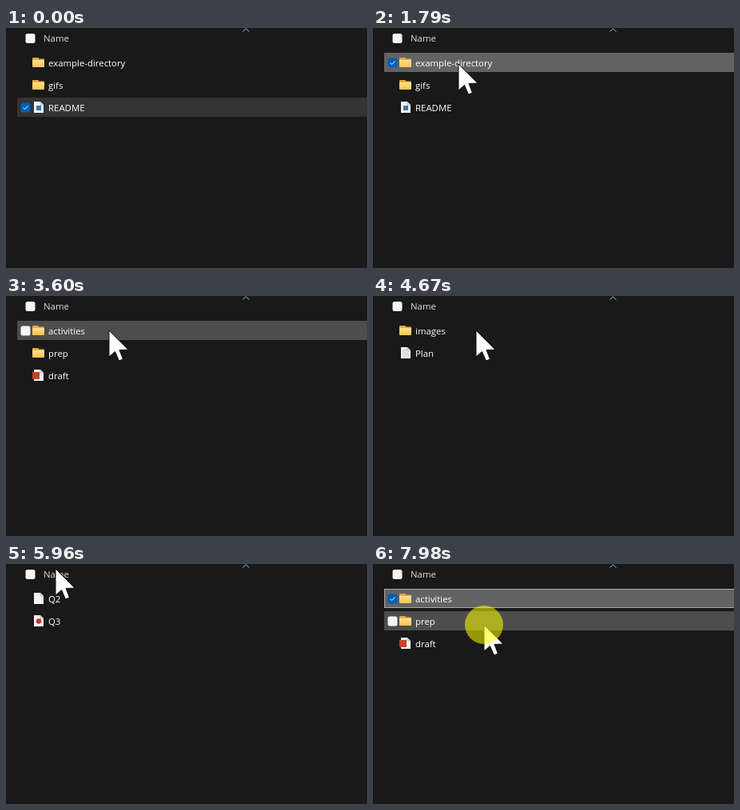
Write an HTML page with a canvas that moves like this. It is 452 px wide and 300 px high and loops after 8 s.

```html
<!DOCTYPE html>
<html lang="en">
<head>
<meta charset="utf-8">
<style>
html, body { margin: 0; width: 100%; height: 100%; overflow: hidden; background: #191919; }
canvas { display: block; }
</style>
</head>
<body>
<canvas id="stage" width="452" height="300"></canvas>
<script>
const ctx = document.getElementById('stage').getContext('2d');
const LOOP = 8000, STEP = 70, ROW_TOP = 31, ROW_HEIGHT = 24, ROW_PITCH = 28;

const rootDir = [['folder', 'example-directory'], ['folder', 'gifs'], ['markdown', 'README']];
const exampleDir = [['folder', 'workshop']];
const workshopDir = [['folder', 'activities'], ['folder', 'prep'], ['slides', 'draft']];
const activitiesDir = [['folder', 'images'], ['text', 'Plan']];
const imagesDir = [['page', 'Q2'], ['pdf', 'Q3']];

// at: start time, hoverAt: when rows begin to react to the pointer
const scenes = [
  { at: 0, rows: rootDir, selected: 2, inactive: true, hoverAt: 0 },
  { at: 1110, rows: rootDir, selected: 0, hoverAt: 0 },
  { at: 1990, rows: exampleDir, hoverAt: 2120 },
  { at: 3140, rows: exampleDir, selected: 0, hoverAt: 0 },
  { at: 3530, rows: workshopDir, hoverAt: 3600 },
  { at: 4270, rows: workshopDir, selected: 0, hoverAt: 0 },
  { at: 4670, rows: activitiesDir, hoverAt: 4740 },
  { at: 5010, rows: activitiesDir, selected: 0, hoverAt: 0 },
  { at: 5280, rows: imagesDir, hoverAt: 5350 },
  { at: 6700, rows: activitiesDir, selected: 0, focusAt: 6830, hoverAt: 0 },
  { at: 7300, rows: workshopDir, selected: 0, focusAt: 7300, hoverAt: 0 },
];

const linear = u => u;
const easeInOut = u => u < .5 ? 2 * u * u : 1 - 2 * (1 - u) ** 2;
const easeOut = u => 1 - (1 - u) ** 1.5;
const easeIn = u => u ** 1.5;
const moves = [
  { at: 200, steps: 12, from: [140, 304], to: [107, 45], ease: easeInOut },
  { at: 2650, steps: 5, from: [107, 45], to: [129, 43], ease: easeOut },
  { at: 5690, steps: 7, from: [129, 43], to: [-26, -42], ease: easeIn },
  { at: 7440, steps: 8, from: [-8, -20], to: [139, 76], ease: linear },
];
const presses = [[1110, 1250], [1720, 1790], [3140, 3210], [3410, 3480],
  [4270, 4340], [5010, 5080], [5210, 5280], [7980, 8000]];

const latest = (list, t) => list.filter(item => item.at <= t).pop();

function pointerAt(t) {
  const move = latest(moves, t);
  if (!move) return [-60, -60];
  const step = Math.min(move.steps, Math.floor((t - move.at) / STEP) + 1);
  const u = move.ease(step / move.steps);
  return move.from.map((a, i) => Math.round(a + (move.to[i] - a) * u));
}

function rowAt([x, y]) {
  const offset = y - ROW_TOP;
  return x >= 14 && offset >= 0 && offset % ROW_PITCH < ROW_HEIGHT ? Math.floor(offset / ROW_PITCH) : -1;
}

function box(x, y, w, h, color, radius = 0) {
  ctx.fillStyle = color;
  ctx.beginPath();
  ctx.roundRect(x, y, w, h, radius);
  ctx.fill();
}

function dot(x, y, r, color) {
  ctx.fillStyle = color;
  ctx.beginPath();
  ctx.arc(x, y, r, 0, 7);
  ctx.fill();
}

function trace(points, color, width = 1) {
  ctx.beginPath();
  points.forEach(([x, y]) => ctx.lineTo(x, y));
  ctx.strokeStyle = color;
  ctx.lineWidth = width;
  ctx.stroke();
}

function label(text, x, y, color) {
  ctx.font = '11.4px "Open Sans", sans-serif';
  ctx.fillStyle = color;
  ctx.fillText(text, x, y);
}

function checkbox(x, y, checked) {
  box(x, y, 12, 12, checked ? '#005fb8' : '#f5f5f5', 2.5);
  if (checked) trace([[x + 3, y + 6], [x + 5, y + 8.2], [x + 9.2, y + 4]], '#fff');
}

function page(y) {
  ctx.fillStyle = '#f4f4f4';
  ctx.beginPath();
  [[35, 0], [43, 0], [47, 4], [47, 14], [35, 14]].forEach(([x, dy]) => ctx.lineTo(x, y + 5 + dy));
  ctx.fill();
  trace([[43, y + 5], [43, y + 9], [47, y + 9]], '#b5b5b5');
}

const icons = {
  folder(y) {
    box(33, y + 6, 8, 6, '#e5a53b', 1);
    box(33, y + 7.5, 15, 10, '#e9b04a', 1);
    const shade = ctx.createLinearGradient(0, y + 9, 0, y + 18);
    shade.addColorStop(0, '#ffe08a');
    shade.addColorStop(1, '#f6c453');
    box(33, y + 9, 15, 9, shade, 1);
  },
  page,
  markdown(y) {
    page(y);
    box(38, y + 10, 6, 6, '#3c78aa');
  },
  slides(y) {
    page(y);
    box(33, y + 8, 9, 9, '#c8432b');
  },
  pdf(y) {
    page(y);
    dot(41, y + 12.5, 3.3, '#c23a2c');
  },
  text(y) {
    page(y);
    for (let i = 0; i < 4; i++) box(37, y + 8 + i * 2.5, i ? 8 : 5, 1, '#b9bcc0');
  },
};

function drawRow([icon, name], index, state) {
  const y = ROW_TOP + index * ROW_PITCH;
  const { hovered, selected, inactive, focused, bright } = state;
  if (hovered || selected) {
    const color = selected && (hovered || bright) ? (inactive ? '#555' : '#636363')
      : selected && inactive ? '#333' : '#4d4d4d';
    box(14, y, 438, ROW_HEIGHT, color);
    if (focused) {
      ctx.strokeStyle = bright ? '#a8a8a8' : '#d0d0d0';
      ctx.lineWidth = 1;
      ctx.strokeRect(14.5, y + .5, 440, ROW_HEIGHT - 1);
    }
    checkbox(18.5, y + 6.5, selected);
  }
  icons[icon](y);
  label(name, 53, y + 17, '#fff');
}

function drawPointer(x, y) {
  ctx.beginPath();
  [[0, 0], [0, 33], [7.5, 26.5], [12.5, 38], [17.5, 36], [13, 24.5], [24, 24]]
    .forEach(([dx, dy]) => ctx.lineTo(x + dx, y + dy));
  ctx.closePath();
  ctx.fillStyle = '#fff';
  ctx.fill();
  ctx.strokeStyle = '#111';
  ctx.lineWidth = 1;
  ctx.stroke();
}

function draw(t) {
  box(0, 0, 452, 300, '#191919');
  checkbox(24.5, 7, false);
  label('Name', 47, 17, '#dedede');
  trace([[296.5, 4.5], [300.5, .8], [304.5, 4.5]], '#9fc3d3');

  const scene = latest(scenes, t);
  const pointer = pointerAt(t);
  const hoverRow = t >= scene.hoverAt ? rowAt(pointer) : -1;
  const trailRow = rowAt(pointerAt(t - 2 * STEP));
  scene.rows.forEach((row, i) => {
    const selected = scene.selected === i;
    drawRow(row, i, {
      selected,
      hovered: hoverRow === i,
      inactive: scene.inactive,
      focused: selected && t >= scene.focusAt,
      bright: selected && trailRow === i,
    });
  });

  drawPointer(...pointer);
  if (presses.some(([down, up]) => t >= down && t < up)) dot(...pointer, 24, 'rgba(255,255,0,.55)');
}

function animate() {
  draw(performance.now() % LOOP);
  requestAnimationFrame(animate);
}
animate();
</script>
</body>
</html>
```
